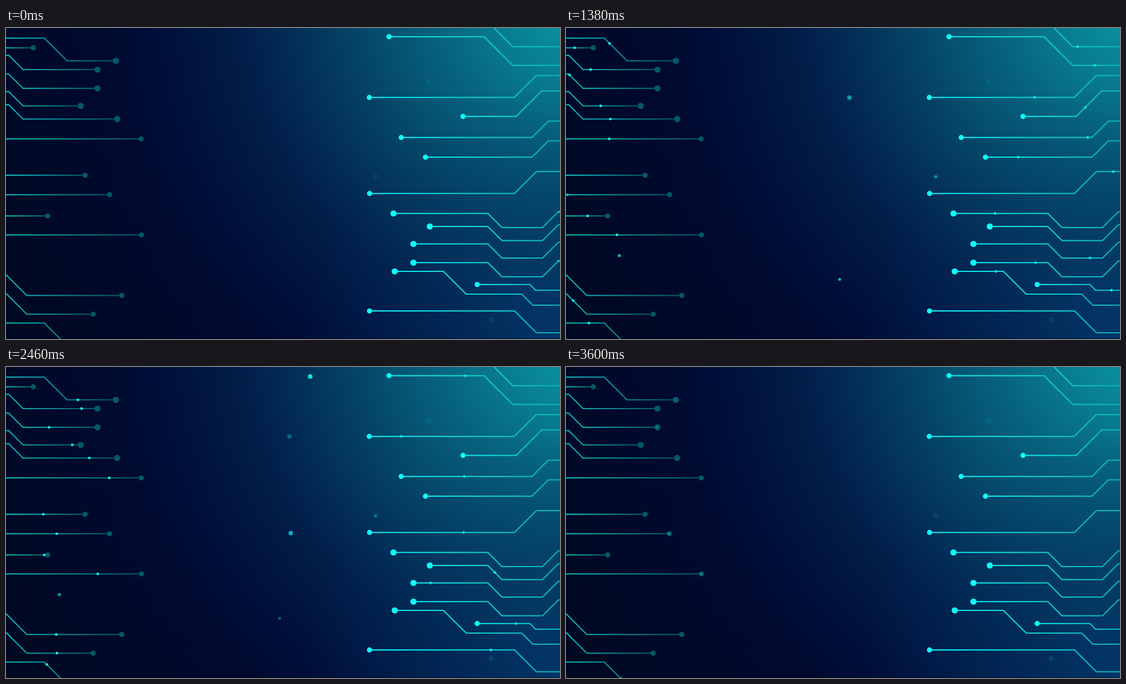
These frames come from a looping animation (998 px wide and 561 px high, 3630 ms). An HTML page with a canvas:

```html
<!DOCTYPE html>
<html lang="en">
<head>
<meta charset="utf-8">
<title>Circuit pulses</title>
<style>
  html, body { margin: 0; width: 100%; height: 100%; overflow: hidden; background: #000824; }
  canvas { display: block; }
</style>
</head>
<body>
<canvas id="stage" width="998" height="561"></canvas>
<script>
const W = 998, H = 561, LOOP = 3630;
const BIG = 5.6, SMALL = 4.7;
const ctx = document.getElementById('stage').getContext('2d');
const traces = [];

// Steps alternate between flat runs and 45° diagonals (signed height).
function trace(side, radius, y, start, speed, steps) {
  const dir = side === 'left' ? 1 : -1;
  let x = dir > 0 ? 0 : W;
  const points = [{ x, y, s: 0 }];
  let s = 0;
  steps.forEach((step, i) => {
    const diagonal = i % 2;
    x += dir * Math.abs(step);
    if (diagonal) y += step;
    s += Math.abs(step) * (diagonal ? Math.SQRT2 : 1);
    points.push({ x, y, s });
  });
  traces.push({ side, radius, start, speed, points, total: s, end: points.at(-1) });
}
const left = (radius, y, start, speed, ...steps) => trace('left', radius, y, start, speed, steps);
const right = (radius, y, start, speed, ...steps) => trace('right', radius, y, start, speed, steps);
const leftHook = (y, start, speed, length) => left(BIG, y, start, speed, 5, 25.7, length);
const rightHook = (y, start, speed, length) =>
  right(BIG, y, start, speed, 3, 28.5, 73, -25.5, length);

left(BIG, 18.3, -5, .0595, 69, 41, 88);
left(SMALL, 35.7, 1005, .0413, 49);
leftHook(49.3, 733, .085, 134);
leftHook(83.2, 1290, .0755, 134);
leftHook(114.8, -11, .0526, 104);
leftHook(138.5, -14, .065, 169.5);
left(SMALL, 200, 600, .1, 243.5);
left(SMALL, 265.6, 1610, .079, 142.5);
left(SMALL, 300.8, 1349, .0822, 186.5);
left(SMALL, 339, -10, .0279, 75);
left(SMALL, 373.2, 32, .0681, 244);
left(SMALL, 445, 1763, .152, 0, 37.5, 171);
left(SMALL, 478.7, 1158, .0824, 0, 37.5, 119.5);
left(SMALL, 532.2, 77, .0316, 69, 41, 88);

right(SMALL, 33.7, -1207, -.0978, 85, -52, 171);
right(SMALL, 67.5, 1044, .1354, 85, -51.7, 171.3);
right(SMALL, 85.7, -6, .1227, 43, 39.5, 261);
right(SMALL, 113.5, 770, .1228, 33, 46, 95.7);
right(SMALL, 168, 714, .1058, 21, 29.5, 235.5);
right(SMALL, 203.5, 0, .1418, 21, 29.5, 191.8);
right(SMALL, 259, 1308, .165, 42.5, 39.5, 261);
rightHook(331.5, -10, .178, 170);
rightHook(355, 1607, .1575, 104.5);
rightHook(386.5, 1004, .1755, 134);
rightHook(420.3, -20, .1245, 134);
right(BIG, 500, 0, .1803, 49, -20, 100, -41, 87.7);
right(SMALL, 473, 1137, .0634, 44, -10.2, 95);
right(SMALL, 549.7, 1755, .2, 42.5, -39.3, 261.3);

function disc(x, y, r, color, alpha = 1) {
  ctx.globalAlpha = alpha;
  ctx.fillStyle = color;
  ctx.beginPath();
  ctx.arc(x, y, r, 0, 7);
  ctx.fill();
  ctx.globalAlpha = 1;
}

function radial(x, y, r, stops) {
  const g = ctx.createRadialGradient(x, y, 0, x, y, r);
  stops.forEach(([at, color]) => g.addColorStop(at, color));
  return g;
}

const night = radial(1040, -60, 1150, [
  [0, '#0a9aa6'], [.064, '#098f9e'], [.25, '#065f7b'], [.41, '#04395e'],
  [.53, '#021f4a'], [.67, '#000e3a'], [.75, '#000a2f'], [1, '#000822']
]);
const depth = radial(1010, 580, 480, [[0, 'rgba(3,66,118,.7)'], [1, 'rgba(3,45,95,0)']]);

function background() {
  for (const paint of [night, depth]) {
    ctx.fillStyle = paint;
    ctx.fillRect(0, 0, W, H);
  }
  ctx.fillStyle = 'rgba(0,0,16,.6)';
  ctx.fillRect(0, H - 1, W, 1);
  disc(761, 97.5, 5, '#0a8296', .3);
  disc(874, 526, 4.5, '#086e96', .3);
  disc(666, 267.5, 5, '#0a6c8c', .25);
}

function drawTrace({ side, radius, points, end }) {
  const isLeft = side === 'left';
  const node = isLeft ? '#055868' : '#12fbfb';
  const g = ctx.createLinearGradient(isLeft ? 0 : W, 0, end.x, 0);
  g.addColorStop(0, isLeft ? '#0cc2c6' : '#0db4ba');
  g.addColorStop(1, isLeft ? '#065562' : '#10f4f5');
  ctx.strokeStyle = g;
  ctx.lineWidth = 2.1;
  ctx.beginPath();
  points.forEach(p => ctx.lineTo(p.x, p.y));
  ctx.stroke();
  disc(end.x, end.y, radius, node);
}

function drawPulse({ side, start, speed, points, total }, t) {
  const s = speed * (t - start) + (speed < 0 ? total : 0);
  if (s <= 0 || s >= total) return;
  const i = points.findIndex(p => p.s >= s);
  const a = points[i - 1], b = points[i];
  const k = (s - a.s) / (b.s - a.s);
  disc(a.x + (b.x - a.x) * k, a.y + (b.y - a.y) * k, 2.4,
    side === 'left' ? '#0ff4f8' : '#0be2ea', Math.min(1, s / 4, (total - s) / 4));
}

// Opacity that rises from one time to a peak and falls to an end time.
const swell = (t, from, peak, to) =>
  Math.max(0, Math.min((t - from) / (peak - from), (to - t) / (to - peak)));

function sparkles(t) {
  const color = '#14dfe8';
  const spark = (x, y, r, level, ...times) => disc(x, y, r, color, level * swell(t, ...times));
  spark(510.6, 125.5, 4.1, .85, 300, 600, 3600);
  spark(548, 17.2, 4.1, 1, 1560, 2460, 3600);
  spark(513, 299.7, 4.1, .75, 2100, 2400, 3600);
  spark(96, 410.5, 3, 1, 0, 1900, 3400);
  spark(493, 453.5, 2.5, .85, 700, 1380, 3500);
  const flicker = .6 + .25 * Math.cos((t - 2010) / 870 * 2 * Math.PI);
  disc(666.3, 268.3, 2.6, color, flicker * Math.min(1, t / 300, Math.max(0, (3600 - t) / 400)));
}

function frame(now) {
  const t = now % LOOP;
  background();
  traces.forEach(drawTrace);
  traces.forEach(tr => drawPulse(tr, t));
  sparkles(t);
}

let origin;
function tick(now) {
  origin ??= now;
  frame(Math.max(0, now - origin));
  requestAnimationFrame(tick);
}
requestAnimationFrame(tick);
</script>
</body>
</html>
```
